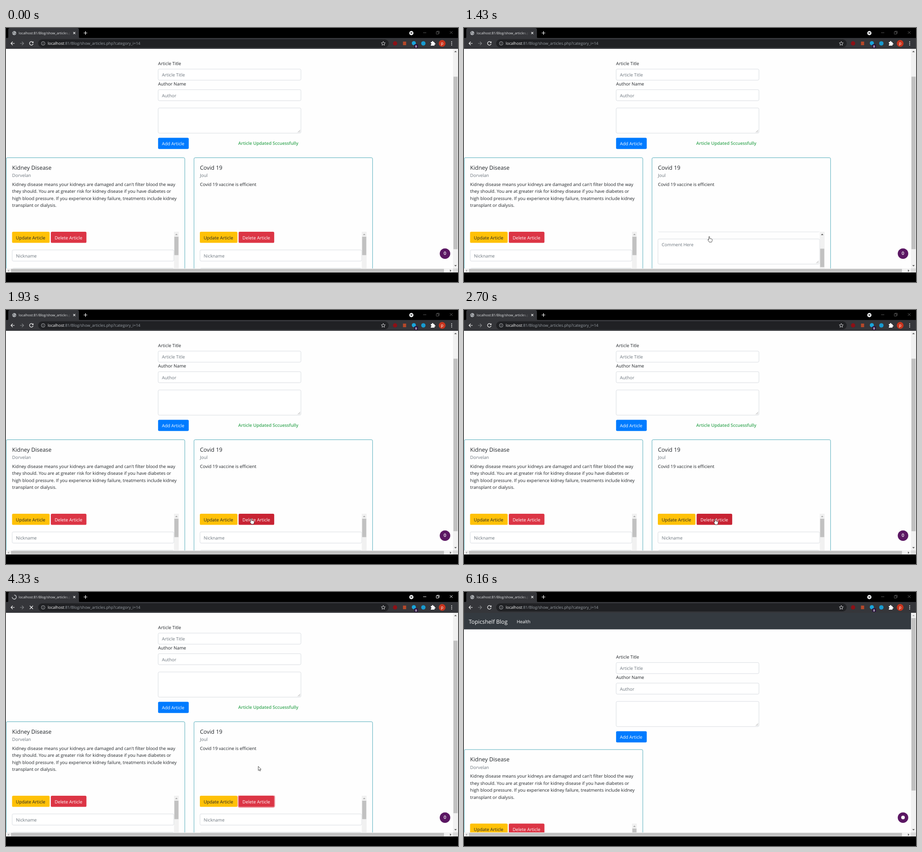
An HTML page for the animation above (6.2 s loop, 998 by 561 pixels).

```html
<!DOCTYPE html>
<html lang="en">
<head>
<meta charset="utf-8">
<title>Article page</title>
<style>
html, body { margin: 0; width: 100%; height: 100%; overflow: hidden; background: #000; }
svg { display: block; width: 998px; height: 561px; fill: #212529; text-rendering: geometricPrecision;
  font: 9.84px "Open Sans", "Noto Sans", sans-serif; }
.line { fill: none; stroke: #fff; stroke-width: 1.2; }
.field { fill: #fff; stroke: #ced4da; stroke-width: .8; }
</style>
</head>
<body>
<svg id="stage" viewBox="0 0 998 561"></svg>
<script>
const muted = 'fill="#6c757d"', white = 'fill="#fff"', medium = 'font-weight="500"';
const text = (x, y, s, attrs = '') => `<text x="${x}" y="${y}" ${attrs}>${s}</text>`;
const rect = (x, y, w, h, fill, r = 0, attrs = '') =>
  `<rect x="${x}" y="${y}" width="${w}" height="${h}" rx="${r}" fill="${fill}" ${attrs}/>`;
const field = (x, y, w, h) => rect(x, y, w, h, '#fff', 2.6, 'class="field"');
const disc = (x, y, r, fill) => `<circle cx="${x}" cy="${y}" r="${r}" fill="${fill}"/>`;
const path = (d, attrs = 'class="line"') => `<path d="${d}" ${attrs}/>`;
const grip = (x, y) => path(`M${x - 5} ${y}l5-5M${x - 2} ${y}l2-2`, 'fill="none" stroke="#777" stroke-width=".7"');
const button = (x, y, w, label, fill, color, id = '') =>
  rect(x, y, w, 24.6, fill, 2.6, id && `id="${id}"`) + text(x + 8.4, y + 16.6, label, `fill="${color}"`);
const arrow = (x, y, dx, dy, fill, id = '') =>
  path(`M${x + dx * 1.6} ${y + dy * 1.6}L${x - dx * 1.2 + dy * 2.8} ${y - dy * 1.2 + dx * 2.8}` +
    `L${x - dx * 1.2 - dy * 2.8} ${y - dy * 1.2 - dx * 2.8}Z`, `fill="${fill}" id="${id}"`);

function card(id, x, title, author, lines) {
  return `<g id="${id}"><g transform="translate(${x} 0)">` +
    rect(.5, 286.5, 394.3, 380, '#fefefe', 2.6, 'stroke="#3fa3b3" stroke-width=".9"') +
    text(13.6, 312.6, title, medium + ' font-size="12.4"') +
    text(13.6, 329.4, author, medium + muted) +
    lines.map((s, i) => text(13.6, 348.6 + i * 15.6, s)).join('') +
    `<g clip-path="url(#inner)"><g id="${id}Scroll">` +
    rect(98, 449, 80.6, 26.6, 'none', 3.6, `id="${id}Ring" stroke="#dc3545" stroke-opacity=".5" stroke-width="2"`) +
    button(13.4, 449.9, 83, 'Update Article', '#ffc107', '#212529') +
    button(99, 449.9, 78.6, 'Delete Article', '#dc3545', '#fff', id + 'Delete') +
    field(13.7, 490.2, 357, 24.6) + text(22, 507, 'Nickname', muted) +
    field(13.7, 530.6, 357, 55.4) + text(22, 547, 'Comment Here', muted) + grip(368.5, 584) +
    '</g></g>' +
    rect(371, 450, 10.6, 190, '#f1f1f1') + arrow(376.3, 456, 0, -1, '#a3a3a3', id + 'Up') +
    rect(371.8, 461, 9, 40.6, '#c1c1c1', 0, `id="${id}Thumb"`) + '</g></g>';
}

const address = 'localhost:81/Blog/show_articles.php';
const chrome =
  rect(0, 0, 998, 46, '#000') + path('M2 22.5q3 0 3-3V4q0-4 4-4H157q4 0 4 4V19.500q0 3 3 3Z', 'fill="#35363a"') +
  rect(0, 22, 998, 24, '#35363a') + rect(71, 25, 774, 18, '#202124', 9) +
  '<g id="globe">' + disc(18.2, 11.2, 4.5, '#aeb1b5') +
  path('M15 8.500l3 1-1 2-3 .5M19 14l1-2 2.500-.5', 'fill="none" stroke="#55585c"') + '</g>' +
  path('M18.2 6.700a4.500 4.500 0 1 1-4.500 4.500', 'id="spinner" fill="none" stroke="#d5d7da" stroke-width="1.4"') +
  `<g clip-path="url(#tab)">${text(28, 13.7, address, 'font-size="7.45" fill="#e4e5e7"')}</g>` +
  rect(128, 4, 15, 14, 'url(#fade)') +
  path('M148.500 8.900l4.500 4.500m0-4.500l-4.500 4.500M171.500 11h8m-4-4v8') +
  path('M19 34h-8m3.800-3.800L11 34l3.800 3.800') +
  path('M31 34h8m-3.800-3.800L39 34l-3.800 3.800', 'fill="none" stroke="#85878a" stroke-width="1.2"') +
  path('M59.200 31.500a4 4 0 1 0 .7 3.200M60 29.700v2.800h-2.800', 'id="reload" class="line"') +
  path('M52.500 30.500l7 7m0-7l-7 7', 'id="stop" class="line"') +
  path('M86 34a4 4 0 1 0-8 0a4 4 0 1 0 8 0M82 33.500v2.600M82 31.500v1', 'fill="none" stroke="#b5b7ba" stroke-width=".9"') +
  `<text x="92" y="37.2" font-size="8.69" fill="#9aa0a6"><tspan fill="#fff">localhost</tspan>${address.slice(9)}?category_i=14</text>` +
  path('M833 29.700l1.300 2.900 3.100.3-2.300 2.100.7 3.100-2.800-1.600-2.800 1.600.7-3.100-2.300-2.100 3.100-.3Z', 'fill="none" stroke="#e2e3e5" stroke-width=".9"') +
  disc(859, 34, 4.7, '#8c1016') + rect(876.5, 30, 7, 8, '#b5482a') + disc(900.500, 33.500, 4.500, '#19a5dc') +
  rect(901.500, 36, 8, 8, '#2b1042', 1.5) + text(903.6, 42.6, '0', white + ' font-size="6.5" font-weight="700"') +
  disc(921.500, 34, 4.800, '#189bd0') +
  path('M938 31h2.500a1.600 1.600 0 1 1 3 0h2.500v2.500a1.600 1.600 0 1 1 0 3v2.500h-8v-2.500a1.500 1.500 0 1 0 0-3Z', white) +
  disc(963, 34, 7.500, '#c8341d') + text(960.3, 36.8, 'p', white + ' font-size="9"') +
  [30.5, 34, 37.5].map(y => disc(984, y, 1, '#fff')).join('') +
  disc(895, 11.2, 4.700, '#e6e7e8') + path('M892.500 10h5l-2.500 3Z', 'fill="#222"') +
  path('M921 10.500h7M950 8.500h5v5h-5ZM951.500 8.500v-1.500h5v5h-1.500M980 7l6 6m0-6l-6 6', 'id="controls" fill="none" stroke-width=".9"');

const page = rect(0, 46, 998, 485, '#fefefe') +
  '<g id="nav">' + rect(0, 46, 987, 36.500, '#343a40') +
  text(10.4, 70, 'Topicshelf Blog', white + ' font-size="12.3"') + text(116.5, 68.8, 'Health', white) + '</g>' +
  '<g id="form">' + text(335.8, 81.6, 'Article Title') + field(336, 90.8, 315.2, 24.400) +
  text(344.2, 107, 'Article Title', muted) + text(335.8, 127.400, 'Author Name') +
  field(336, 136.2, 315.2, 24.400) + text(344.2, 152.7, 'Author', muted) +
  field(336, 176.700, 315.2, 55.500) + grip(649.5, 230.5) +
  button(335.8, 242.600, 67.700, 'Add Article', '#007bff', '#fff') + '</g>' +
  card('kidney', 0, 'Kidney Disease', 'Dorvelan', [
    "Kidney disease means your kidneys are damaged and can't filter blood the way",
    'they should. You are at greater risk for kidney disease if you have diabetes or',
    'high blood pressure. If you experience kidney failure, treatments include kidney',
    'transplant or dialysis.']) +
  '<g id="before">' + text(512.8, 258.2, 'Article Updated Sccuessfully', 'fill="#39a857" font-weight="600" font-size="9.75"') +
  card('covid', 414.6, 'Covid 19', 'Joul', ['Covid 19 vaccine is efficient']) + '</g>' +
  disc(969.3, 498.3, 11.600, '#5b1763') + text(966.3, 501.400, '0', white + ' id="count" font-size="10" font-weight="600"') +
  '<circle id="badge" cx="969.3" cy="498" r="4" fill="#fff"/>';

const bars = rect(987, 46, 11, 485, '#f1f1f1') + rect(988, 57, 9, 381, '#c1c1c1', 0, 'id="thumb"') +
  arrow(992.5, 52, 0, -1, '#505050', 'up') + arrow(992.5, 525, 0, 1, '#505050') +
  rect(0, 531, 987, 9, '#f1f1f1') + rect(11, 532, 956, 7.500, '#c1c1c1') +
  arrow(5.5, 536, -1, 0, '#a3a3a3') + arrow(981.500, 536, 1, 0, '#505050') + rect(987, 531, 11, 9, '#dcdcdc');

const pointer =
  path('M0 0V9.300L2.100 7.400L3.500 10.400L5 9.700L3.600 6.800H6.300Z', 'id="arrow" fill="#fff" stroke="#222" stroke-width=".8"') +
  path('M-1 1q0-1.200 1-1.200t1 1.200V4.500q2-.5 2.200.5q1.800-.3 2 .7q1.500 0 1.500 1.300q0 3-1.700 5.500H.2L-3 7.800q-.5-1.500 1-1.200l1 .8Z',
    'id="hand" fill="#fff" stroke="#222" stroke-width=".8"');

stage.innerHTML = `<defs>
  <clipPath id="view"><rect y="46" width="998" height="485"/></clipPath>
  <clipPath id="inner"><rect x="12" y="449.5" width="359.2" height="190"/></clipPath>
  <clipPath id="tab"><rect x="28" width="115" height="22"/></clipPath>
  <linearGradient id="fade"><stop stop-color="#35363a" stop-opacity="0"/><stop offset="1" stop-color="#35363a"/></linearGradient>
  </defs>${chrome}<g clip-path="url(#view)">${page}</g>${bars}<g id="pointer">${pointer}</g>`;

const $ = id => document.getElementById(id);
const set = (id, name, value) => $(id).setAttribute(name, value);
const show = (id, on) => set(id, 'visibility', on ? 'visible' : 'hidden');
const ease = (t, a, b) => { const k = Math.min(1, Math.max(0, (t - a) / (b - a))); return k * k * (3 - 2 * k); };
const lerp = (a, b, k) => a + (b - a) * k;

// time, x, y of the pointer tip
const route = [[430, 598, 219], [1110, 538.5, 452.5], [1430, 541.5, 460.5], [2200, 541.5, 460.5],
  [2680, 554.5, 461.5], [3640, 554.5, 461.5], [4300, 557, 385]];
function tip(t) {
  let i = 1;
  while (i < route.length - 1 && t > route[i][0]) i++;
  const [a, x, y] = route[i - 1], [b, u, v] = route[i], k = ease(t, a, b);
  return [lerp(x, u, k), lerp(y, v, k)];
}

function draw(t) {
  const loaded = t >= 4420, loading = t >= 3630 && !loaded;
  const scroll = ease(t, 1230, 1380) - ease(t, 1660, 1790);
  const [x, y] = tip(t), hand = t > 1000 && y >= 450;

  for (const id of ['nav', 'badge']) show(id, loaded);
  for (const id of ['before', 'count']) $(id).style.display = loaded ? 'none' : '';
  set('form', 'transform', `translate(0 ${loaded ? 65 : 0})`);
  set('kidney', 'transform', `translate(0 ${loaded ? 61.5 : 0})`);
  set('thumb', 'y', loaded ? 57.5 : 107.5);
  set('up', 'fill', loaded ? '#a3a3a3' : '#505050');

  set('covidScroll', 'transform', `translate(0 ${-64.6 * scroll})`);
  set('covidThumb', 'y', 461 + 26.4 * scroll);
  set('covidUp', 'fill', scroll > 0 ? '#505050' : '#a3a3a3');
  const hover = ease(t, 1130, 1280) - ease(t, 1300, 1400) + ease(t, 1780, 1920) - ease(t, 3850, 4000);
  set('covidDelete', 'fill', `rgb(${lerp(220, 200, hover)},${lerp(53, 35, hover)},${lerp(69, 51, hover)})`);
  set('covidRing', 'opacity', ease(t, 3610, 3760));
  set('kidneyRing', 'opacity', 0);

  show('globe', !loading);
  show('spinner', loading);
  show('reload', !loading);
  show('stop', loading);
  set('spinner', 'transform', `rotate(${(t - 4330) * .36} 18.2 11.2)`);
  set('controls', 'stroke', t >= 3630 && t < 6160 ? '#fff' : '#606060');

  $('pointer').style.display = t >= 430 && !loaded ? '' : 'none';
  set('pointer', 'transform', `translate(${x} ${y})`);
  show('hand', hand);
  show('arrow', !hand);
}

const start = performance.now();
(function tick() {
  draw((performance.now() - start) % 6200);
  requestAnimationFrame(tick);
})();
</script>
</body>
</html>
```
